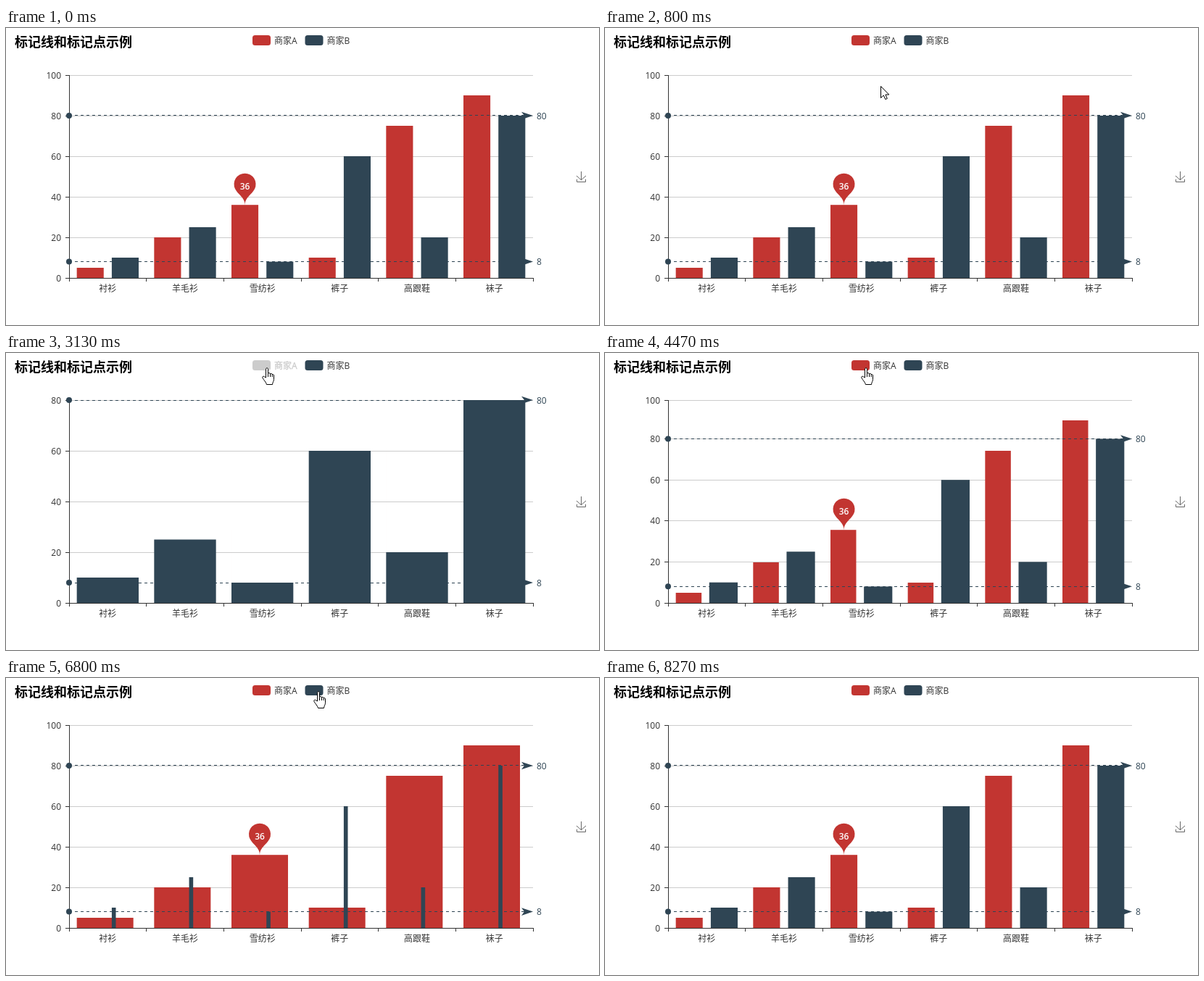
Animation of 818 by 410 pixels, one loop 8790 ms. Source, as an HTML page:

```html
<!DOCTYPE html>
<html lang="zh-CN">
<head>
<meta charset="utf-8">
<title>标记线和标记点示例</title>
<style>
html, body { margin: 0; width: 100%; height: 100%; overflow: hidden; background: #fff; }
svg { display: block; }
text { font: 12px "Open Sans", "Noto Sans CJK SC", "Noto Sans CJK", sans-serif; fill: #333; }
.title { font-size: 18px; font-weight: 700; fill: #000; }
.mid { text-anchor: middle; }
.end { text-anchor: end; }
</style>
</head>
<body>
<svg id="stage" width="818" height="410" viewBox="0 0 818 410">
  <text class="title" x="12" y="26">标记线和标记点示例</text>
  <path d="M787 204L793.4 209.8L800 204M787.5 208.8V212.5H799.5V208.8M793.5 209.8V198" fill="none" stroke="#666"/>
  <g id="chart"></g>
  <g id="pointer" fill="#fff" stroke="#000" stroke-linejoin="round"></g>
</svg>
<script>
const LOOP = 8790, STEP = 200 / 3, MORPH = 300;
const RED = '#c23531', NAVY = '#2f4554', OFF = '#ccc';
const RED_LIT = '#d53a35', NAVY_LIT = '#334b5c';
const LEFT = 87, RIGHT = 727, TOP = 65, BASE = 345;
const CAT = (RIGHT - LEFT) / 6, FULL = CAT * 0.8, HALF = FULL / 2.3, SHIFT = HALF * 1.3;

const names = ['衬衫', '羊毛衫', '雪纺衫', '裤子', '高跟鞋', '袜子'];
const shopA = [5, 20, 36, 10, 75, 90];
const shopB = [10, 25, 8, 60, 20, 80];

// legend clicks
const HIDE_A = 2850, SHOW_A = 4272, HIDE_B = 5450, SHOW_B = 6784;

// pointer path: time, x, y (no position = out of view)
const path = [
  [0], [130, 801, 396], [400, 636, 268], [600, 480, 152], [800, 380, 80],
  [1000, 322, 57], [1467, 324, 42], [1660, 324, 42], [1733, 325, 40],
  [2134, 325, 40], [2400, 346, 26], [2533, 359, 20], [4600, 359, 20],
  [5067, 430, 18], [7200, 430, 18], [7800, 14, 293], [7860],
  [8060, 18, 385], [8200, 2, 398], [8260], [LOOP]
];

const ARROW = '<path d="M.5.5V16.5L4.3 13L6.8 18.5L9.3 17.4L6.9 12H11.8Z"/>';
const HAND = '<path d="M5.5 14V2.5C5.5 .1 8.5 .1 8.5 2.5V8.5C9 7 11.3 7.3 11.5 9C12 7.9 14 8.2 14.2 9.7' +
  'C15 9 16.5 9.6 16.5 11V16.5C16.5 19 14.8 20 14.5 23.5H6.5C6 20.5 2.5 17.5 .9 14.2C.2 12.6 2 11.6 3.3 12.6Z' +
  'M8.5 8.5V13M11.5 9V13M14.2 9.7V13"/>';

const chart = document.getElementById('chart');
const pointer = document.getElementById('pointer');

const mix = (a, b, p) => a + (b - a) * p;
const crisp = v => Math.floor(v) + 0.5;
const within = (t, from, to) => t >= from && t < to;

function eased(t, start) {
  const p = Math.min(1, Math.max(0, (t - start) / MORPH));
  return 1 - (1 - p) ** 3;
}

const line = (x1, y1, x2, y2, color, extra = '') =>
  `<path d="M${x1} ${y1}L${x2} ${y2}" stroke="${color}" ${extra}/>`;
const rect = (x, y, w, h, color, r = 0) =>
  `<rect x="${x}" y="${y}" width="${w}" height="${h}" rx="${r}" fill="${color}"/>`;
const text = (x, y, s, cls = '', style = '') =>
  `<text x="${x}" y="${y}" class="${cls}" style="${style}">${s}</text>`;

function pin(x, y, label) {
  const r = 15, dy = r * r / (50 - r), cy = y - 50 + r + dy;
  const dx = Math.sqrt(r * r - dy * dy), sin = dy / r, cos = dx / r;
  const ey = cy + dy, bx = dx - sin * r * 0.6, by = ey + cos * r * 0.6, ty = y - r * 0.7;
  return `<path fill="${RED}" d="M${x - dx} ${ey}A${r} ${r} 0 1 1 ${x + dx} ${ey}` +
    `C${x + bx} ${by} ${x} ${ty} ${x} ${y}C${x} ${ty} ${x - bx} ${by} ${x - dx} ${ey}Z"/>` +
    text(x, 222.5, label, 'mid', 'fill:#fff;font-weight:600');
}

function markLine(y, value) {
  return line(LEFT, crisp(y), RIGHT, crisp(y), NAVY, 'stroke-dasharray="4 4"') +
    `<circle cx="${LEFT}" cy="${y}" r="4" fill="${NAVY}"/>` +
    `<path d="M${RIGHT} ${y}l-16 -5.3l4 5.3l-4 5.3z" fill="${NAVY}"/>` +
    text(732, y + 4.7, value, '', `fill:${NAVY}`);
}

function legend(x, label, color, on) {
  return rect(x, 10, 25, 14, on ? color : OFF, 3.5) +
    text(x + 30, 22, label, '', on ? '' : `fill:${OFF};stroke:${OFF};stroke-width:.3px`);
}

function pointerAt(t) {
  const i = path.findIndex(k => k[0] > t);
  const [t0, x0, y0] = path[i - 1], [t1, x1 = x0, y1 = y0] = path[i];
  if (x0 === undefined) return null;
  const p = (t - t0) / (t1 - t0);
  return [mix(x0, x1, p), mix(y0, y1, p)];
}

const overItem = ([x, y], left) => x >= left && x <= left + 62 && y >= 10 && y <= 24;

function drawChart(t, pos) {
  const onA = !within(t, HIDE_A, SHOW_A), onB = !within(t, HIDE_B, SHOW_B);
  const soloB = t < SHOW_A ? eased(t, HIDE_A) : 1 - eased(t, SHOW_A);
  const soloA = t < SHOW_B ? eased(t, HIDE_B) : 1 - eased(t, SHOW_B);
  const litA = pos && t < HIDE_A && overItem(pos, 340);
  const litB = pos && t < HIDE_B && overItem(pos, 412);
  const colorA = litA ? RED_LIT : RED, colorB = litB ? NAVY_LIT : NAVY;
  const unit = (BASE - TOP) * mix(1 / 100, 1 / 80, soloB);
  const yOf = v => BASE - v * unit;
  const slotA = mix(HALF, FULL, soloA);
  const widthA = slotA * (1 - soloB), widthB = mix(HALF, FULL, soloB) * (1 - soloA);
  const barLeft = i => LEFT + CAT * (i + 0.1);
  let grid = '', axis = '', bars = '', marks = '';

  for (let v = 0; v <= (onA ? 100 : 80); v += 20) {
    const y = v === 100 ? TOP : yOf(v), c = crisp(y + 0.01);
    if (v) grid += line(LEFT, c, RIGHT, c, '#ccc');
    axis += line(LEFT - 5, c, LEFT, c, '#333') + text(76, y + 4.7, v, 'end');
  }
  axis += line(LEFT + 0.5, TOP, LEFT + 0.5, BASE + 1, '#333');
  axis += line(LEFT, BASE + 0.5, RIGHT + 1, BASE + 0.5, '#333');
  for (let i = 0; i <= 6; i++) {
    const x = crisp(LEFT + CAT * i);
    axis += line(x, BASE, x, BASE + 5, '#333');
  }
  names.forEach((s, i) => axis += text(LEFT + CAT * (i + 0.5), 364, s, 'mid'));

  if (widthA > 0) shopA.forEach((v, i) => {
    const h = v * 2.8;
    bars += rect(barLeft(i), BASE - h, widthA, h, colorA);
  });
  if (widthB > 0) shopB.forEach((v, i) => {
    bars += rect(barLeft(i) + SHIFT * (1 - soloB), yOf(v), widthB, v * unit, colorB);
  });

  if (onA) marks += pin(barLeft(2) + slotA / 2, BASE - 36 * 2.8, 36);
  if (onB) marks += markLine(yOf(80), 80) + markLine(yOf(8), 8);

  chart.innerHTML = grid + axis + bars + marks +
    legend(340, '商家A', colorA, onA) + legend(412.5, '商家B', colorB, onB);
}

function drawPointer(pos) {
  if (!pos) { pointer.innerHTML = ''; return; }
  const hand = overItem(pos, 340) || overItem(pos, 412);
  const x = Math.round(pos[0]) - (hand ? 6 : 0), y = Math.round(pos[1]);
  pointer.setAttribute('transform', `translate(${x} ${y})`);
  pointer.innerHTML = hand ? HAND : ARROW;
}

const start = performance.now();
let last = -1;

function tick() {
  const step = Math.floor(((performance.now() - start) % LOOP) / STEP + 0.06);
  if (step !== last) {
    last = step;
    const t = step * STEP, pos = pointerAt(t);
    drawChart(t, pos);
    drawPointer(pos);
  }
  requestAnimationFrame(tick);
}
tick();
</script>
</body>
</html>
```
